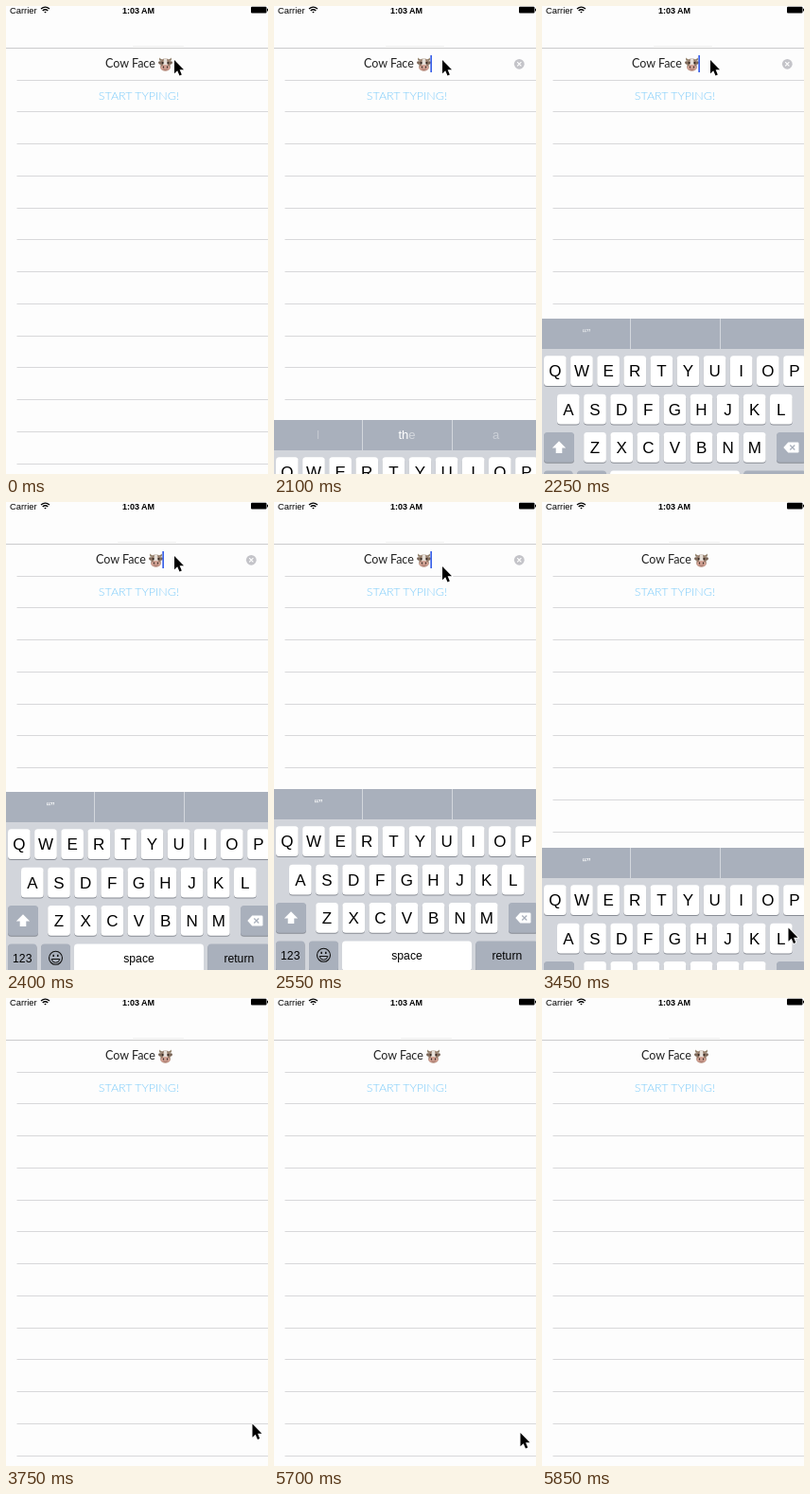
An HTML page that plays this animation: 277x494 px, repeating every 6150 ms.

```html
<!DOCTYPE html>
<html lang="en">
<head>
<meta charset="utf-8">
<title>Search field with keyboard</title>
<style>
  html, body { margin: 0; width: 100%; height: 100%; overflow: hidden; background: #fdfdfd; }
  svg { display: block; width: 100vw; height: 100vh; }
  text { font-family: "Liberation Sans", Arial, sans-serif; text-anchor: middle; }
  .cell { font: 12.5px Lato, "Open Sans", sans-serif; }
  .hint { font-weight: 300; fill: #7ccbfa; }
  .letter { font-size: 17px; }
  .label { font-size: 12.2px; }
</style>
</head>
<body>
<svg viewBox="0 0 277 494" xmlns="http://www.w3.org/2000/svg">
  <rect width="277" height="494" fill="#fdfdfd"/>

  <g id="status">
    <text x="4" y="7.6" font-size="9.4" style="text-anchor:start">Carrier</text>
    <g fill="none" stroke="#000" stroke-width="1.3">
      <path d="M37 3.1Q41.5 -.9 46 3.1"/>
      <path d="M38.7 5Q41.5 2.5 44.3 5"/>
      <path d="M40.3 6.3L41.5 7.6L42.7 6.3Q41.5 5.2 40.3 6.3Z" fill="#000" stroke="none"/>
    </g>
    <text x="140" y="7.6" font-size="9" font-weight="bold">1:03 AM</text>
    <rect x="259" y=".8" width="16.5" height="6.7" rx="1"/>
    <rect x="276" y="2.8" width="1" height="2.6"/>
  </g>

  <rect id="navMark" y="42" height="1" fill="#f0f0f0"/>
  <rect y="44" width="277" height="1" fill="#cbcbcc"/>
  <g id="rows" fill="#d8d8da"></g>

  <g id="field">
    <text class="cell" x="105" y="65.2" fill="#222" style="text-anchor:start">Cow Face</text>
    <g transform="translate(168.5 61.5)">
      <path d="M-5 -3.5Q-7.3 -4 -6 -7Q-5.3 -5 -3.2 -5.2ZM5 -3.5Q7.3 -4 6 -7Q5.3 -5 3.2 -5.2Z" fill="#8d7c66"/>
      <path d="M-4 -3Q-7.8 -4 -7.5 -1.4Q-6.6 .8 -4 0ZM4 -3Q7.8 -4 7.5 -1.4Q6.6 .8 4 0Z" fill="#776355"/>
      <path d="M0 -6Q5 -6 5 -1.5Q5 1 5.2 3.2Q4.6 7 0 7Q-4.6 7 -5.2 3.2Q-5 1 -5 -1.5Q-5 -6 0 -6Z" fill="#927967"/>
      <path d="M-1.6 -6H1.6L2.4 2H-2.4Z" fill="#e6dfd8"/>
      <ellipse cy="3.8" rx="5" ry="3.2" fill="#d0a092"/>
      <g fill="#332722">
        <circle cx="-2.9" cy="-1.4" r="1.1"/><circle cx="2.9" cy="-1.4" r="1.1"/>
        <ellipse cx="-2" cy="3" rx=".7" ry=".9"/><ellipse cx="2" cy="3" rx=".7" ry=".9"/>
      </g>
      <path d="M-2.2 5.3Q0 6.3 2.2 5.3" fill="none" stroke="#7d5148" stroke-width=".6"/>
    </g>
  </g>
  <text class="cell hint" x="140.5" y="99">START TYPING!</text>
  <rect id="caret" x="165.3" y="52" width="1.7" height="18" fill="#3b62e8"/>
  <g id="clear">
    <circle cx="259.3" cy="61.3" r="5.4" fill="#c4c4c9"/>
    <path d="M257.2 59.2L261.4 63.4M261.4 59.2L257.2 63.4" stroke="#fff" stroke-width="1.1"/>
  </g>

  <g id="keyboard">
    <rect width="277" height="200" fill="#d2d5db"/>
    <rect width="277" height="32" fill="#a9b0bc"/>
    <path d="M93.5 0V32M188.5 0V32" stroke="#d3d7dd"/>
    <g id="words" fill="#fff" font-size="13">
      <text x="46.5" y="19.5" opacity=".3">I</text>
      <text x="140.5" y="19.5">th<tspan fill-opacity=".5">e</tspan></text>
      <text x="234.5" y="19.5" opacity=".4">a</text>
    </g>
    <text id="quotes" x="47" y="20" font-size="13" fill="#fff">“”</text>
    <g id="keys"></g>
    <path d="M18 129.3L25.2 136.6H21.3V142H14.7V136.6H10.8Z" fill="#fff"/>
    <path d="M255.3 136L260.3 130.6H270.3Q271.5 130.6 271.5 131.8V140.2Q271.5 141.4 270.3 141.4H260.3Z" fill="#fff"/>
    <path d="M262.3 133.5L267.3 138.5M267.3 133.5L262.3 138.5" stroke="#a9b0bc" stroke-width="1.3"/>
    <g transform="translate(52.5 175.3)" fill="none" stroke="#111">
      <circle r="7" stroke-width="1.1"/>
      <path d="M-4.3 1.2H4.3Q3.6 5 0 5Q-3.6 5 -4.3 1.2Z"/>
      <path d="M-2.3 -3.5V-1.2M2.3 -3.5V-1.2" stroke-width="1.5"/>
    </g>
  </g>

  <path id="pointer" d="M0 0V14.2L3.2 11.2L5.5 16.4L7.8 15.4L5.6 10.3H10Z"
        stroke="#fff" stroke-width="1.6" paint-order="stroke"/>
</svg>
<script>
  const LOOP = 6150;
  const PITCH = 28.125;
  const $ = id => document.getElementById(id);

  function add(parent, tag, attrs, text) {
    const el = document.createElementNS("http://www.w3.org/2000/svg", tag);
    for (const name in attrs) el.setAttribute(name, attrs[name]);
    if (text) el.textContent = text;
    parent.appendChild(el);
  }

  function key(x, row, width, label, dark, style = "letter") {
    const y = 39.3 + row * 40.4;
    const box = { x, width, height: 31.7, rx: 3.5 };
    add($("keys"), "rect", { ...box, y: y + 1, fill: "#888c94" });
    add($("keys"), "rect", { ...box, y, fill: dark ? "#a9b0bc" : "#fff" });
    const baseline = y + (style === "letter" ? 22 : 19.5);
    if (label) add($("keys"), "text", { x: x + width / 2, y: baseline, class: style }, label);
  }

  for (let i = 0; i < 13; i++) {
    add($("rows"), "rect", { x: 11.5, y: Math.floor(78.2 + 33.75 * i), width: 266, height: 1 });
  }

  [["QWERTYUIOP", 2], ["ASDFGHJKL", 16], ["ZXCVBNM", 44.2]].forEach(([letters, left], row) => {
    [...letters].forEach((c, i) => key(left + i * PITCH, row, 23.7, c));
  });
  key(2, 2, 32, "", true);
  key(248, 2, 31, "", true);
  key(2, 3, 30.5, "123", true, "label");
  key(37, 3, 31, "", true);
  key(72, 3, 137, "space", false, "label");
  key(213.3, 3, 66, "return", true, "label");

  // Each track lists [start time, value...]; values hold until the next entry.
  const keyboardTop = [[0, 500], [2100, 437], [2250, 330], [2400, 306], [2550, 303],
    [3450, 365], [3600, 482], [3750, 500]];
  const caretAlpha = [[0, 0], [2100, 1], [2700, 0.5], [2850, 0], [3150, 1], [3450, 0]];
  const pointerPos = [[0, 178, 57], [2550, 178, 68], [2700, 203, 352], [2850, 214, 403],
    [3000, 221, 414], [3150, 259, 450], [3300, 260.5, 449.5], [5700, 260.5, 459]];

  const at = (track, t) => track.filter(step => step[0] <= t).pop().slice(1);
  const show = (id, alpha) => $(id).setAttribute("opacity", Number(alpha));
  const move = (id, x, y) => $(id).setAttribute("transform", `translate(${x} ${y})`);

  function draw(t) {
    const editing = t >= 2100 && t < 3450;
    move("keyboard", 0, at(keyboardTop, t)[0]);
    move("field", editing ? -10 : 0, 0);
    move("pointer", ...at(pointerPos, t));
    show("pointer", t < 5850);
    show("caret", at(caretAlpha, t)[0]);
    show("clear", editing);
    show("words", t < 2250);
    show("quotes", t < 2250 ? 0 : t < 2400 ? 0.75 : 1);
    $("navMark").setAttribute("x", editing ? 118 : 134);
    $("navMark").setAttribute("width", editing ? 62 : 54);
  }

  function tick() {
    draw(performance.now() % LOOP);
    requestAnimationFrame(tick);
  }
  tick();
</script>
</body>
</html>
```
